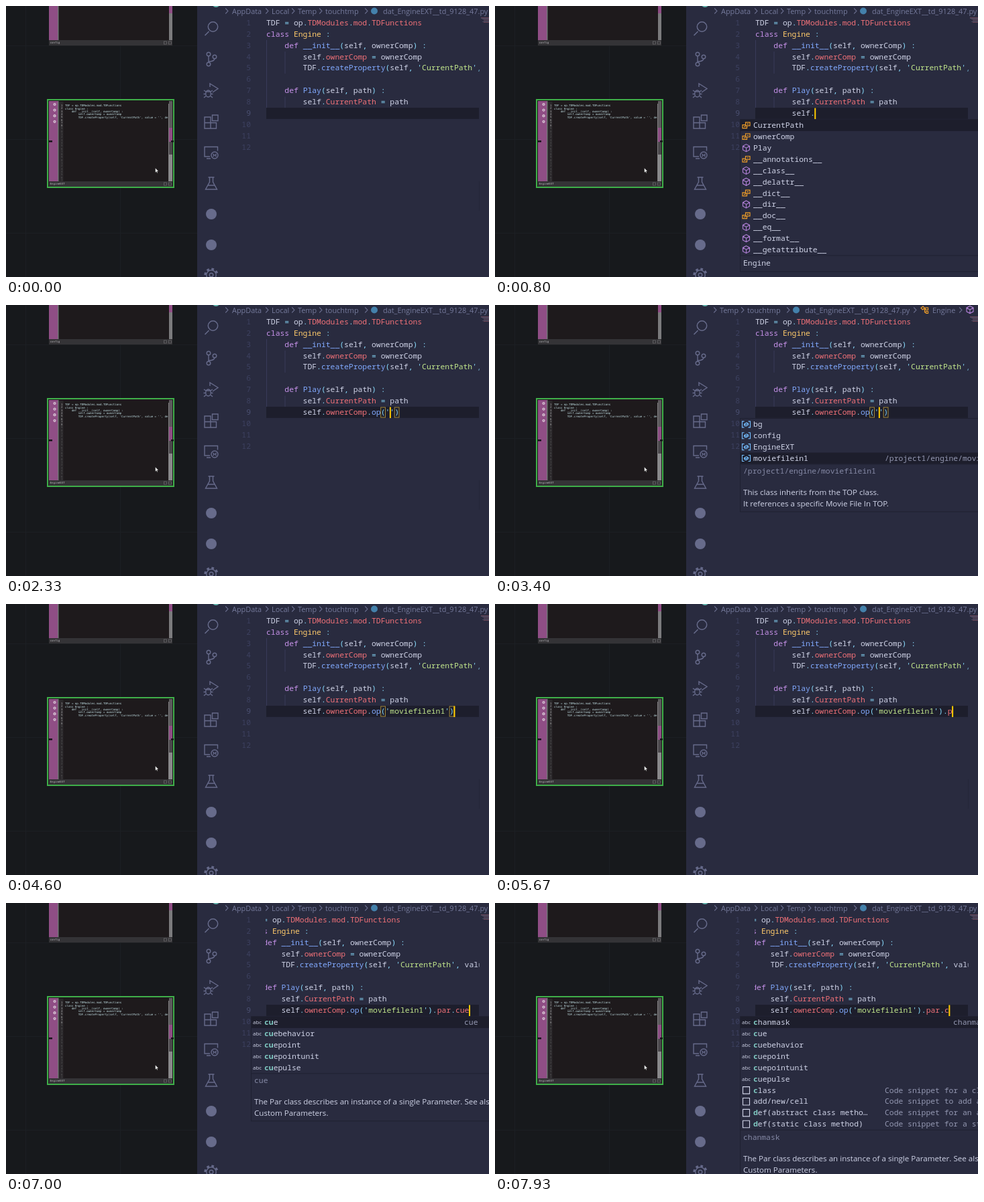
An HTML page for the animation above (8000 ms loop, 720 by 405 pixels).

```html
<!DOCTYPE html>
<html lang="en">
<head>
<meta charset="utf-8">
<title>Code editor</title>
<style>
html, body { margin: 0; width: 100%; height: 100%; overflow: hidden; background: #17191c; }
svg { display: block; width: 100vw; height: 100vh; }
text { white-space: pre; }
.mono { font: 11.38px "Noto Sans Mono", "DejaVu Sans Mono", monospace; }
.sans { font: 11.6px "Open Sans", "Noto Sans", sans-serif; }
.crumb { font: 10.9px "Open Sans", "Noto Sans", sans-serif; }
.mini { font: 4.12px "DejaVu Sans Mono", monospace; }
</style>
</head>
<body>
<svg id="stage" viewBox="0 0 720 405" xmlns="http://www.w3.org/2000/svg"></svg>
<script>
const LOOP = 8000, CW = 6.828, LH = 16.87, LEFT = 388, CARET_MAX = 690.5, BLINK = 530;
const BG = '#292b3f', DARK = '#1d1e2c', DIM = '#676b8b', FG = '#d0d4e8', YELLOW = '#ffcc00';

const rect = (x, y, w, h, fill, extra = '') =>
  `<rect x="${x}" y="${y}" width="${w}" height="${h}" fill="${fill}" ${extra}/>`;
const line = (d, stroke, width = 1) =>
  `<path d="${d}" fill="none" stroke="${stroke}" stroke-width="${width}"/>`;
const disc = (x, y, r, fill) => `<circle cx="${x}" cy="${y}" r="${r}" fill="${fill}"/>`;
const esc = s => s.replace(/&/g, '&amp;').replace(/</g, '&lt;');
const text = (x, y, s, fill, cls = 'mono', extra = '') =>
  `<text x="${x}" y="${y}" fill="${fill}" class="${cls}" ${extra}>${s}</text>`;
const rowY = n => 25 + LH * (n - 1);

// Syntax colouring
const TOKEN = /'[^']*'?|\b(?:class|def)\b|\.?[A-Za-z_]\w*\(?|[=:.,()]|\s+|./g;
function paint(src) {
  const span = (s, c) => `<tspan fill="${c}">${esc(s)}</tspan>`;
  let last = '';
  return src.replace(TOKEN, tok => {
    const prev = last;
    if (tok.trim()) last = tok;
    if (tok[0] === "'") {
      const end = tok.length > 1 && tok.endsWith("'") ? "'" : '';
      return span("'", '#89ddff') + span(tok.slice(1, tok.length - end.length), '#c3e88d') + span(end, '#89ddff');
    }
    if (tok === 'class' || tok === 'def') return span(tok, '#c792ea');
    if (prev === 'class') return span(tok, '#ffcb6b');
    if (/\w\($/.test(tok)) {
      const dot = tok[0] === '.' ? '.' : '';
      return span(dot, '#89ddff') + span(tok.slice(dot.length, -1), '#82aaff') + span('(', '#89ddff');
    }
    if (/^\.\w/.test(tok)) return span('.', '#89ddff') + span(tok.slice(1), '#f07178');
    return span(tok, /^[=:.,()]$/.test(tok) ? '#89ddff' : FG);
  });
}

const SOURCE = [
  'TDF = op.TDModules.mod.TDFunctions',
  'class Engine :',
  '    def __init__(self, ownerComp) :',
  '        self.ownerComp = ownerComp',
  "        TDF.createProperty(self, 'CurrentPath', value = '', de",
  '',
  '    def Play(self, path) :',
  '        self.CurrentPath = path'
];

// Node network
function network() {
  const grid = line('M29.5 0V405M170.5 0V405M0 59.5H285M0 199.5H285M0 339.5H285', '#1c1f23');
  const footer = (y, name) => rect(64, y, 184, 8, '#343336') +
    text(65.5, y + 5.3, name, '#b8b8bc', 'mini') +
    `<g fill="none" stroke="#77777b" stroke-width=".6"><rect x="235.5" y="${y + 2}" width="4" height="4"/><rect x="242.5" y="${y + 2}" width="4" height="4"/></g>`;
  const top = rect(64, 0, 184, 52, '#1e1a1c') + rect(64, 0, 13, 52, '#8f4e85') + rect(77, 0, 1.5, 52, '#77777a') +
    rect(243, 0, 5, 11, '#8f4e85') + rect(243, 11, 5, 41, '#7b7b7d') + footer(51, 'config');
  let node = rect(62, 140, 188, 131, '#1e1a1c', 'stroke="#3fae49" stroke-width="2"') +
    rect(64, 142, 13, 120, '#8f4e85') + rect(77, 142, 1.5, 120, '#77777a') +
    rect(79, 143, 6.5, 119, '#2a272a') +
    rect(243, 142, 5, 40, '#5c5a5d') + rect(243, 182, 5, 21, '#8f4e85') +
    rect(243, 203, 5, 19, '#4b484c') + rect(243, 222, 5, 40, '#8a8a8c') +
    line('M242.5 146V262', '#9a9a9c', .8) + rect(64, 201, 5, 2.5, '#17131a') + rect(246, 201, 4, 2.5, '#17131a') +
    footer(262, 'EngineEXT');
  for (let i = 0; i < 4; i++) node += disc(72.5, 147 + 8.6 * i, 2.1, '#d9c6d6') + disc(72.5, 147 + 8.6 * i, .8, '#8f4e85');
  for (let i = 0; i < 27; i++) node += text(82, 150 + 4.3 * i, (i + 1) % 10, i < 8 ? '#aaa' : '#555', 'mini');
  SOURCE.slice(0, 5).forEach((s, i) => node += text(88, 150.4 + 4.3 * i, s, '#c5e3e8', 'mini'));
  const pointer = '<path d="M222.5 242l.2 7 1.6-1.5 1 2.3 1-.5-1-2.2 2-.2z" fill="#fff" stroke="#111" stroke-width=".4"/>';
  return rect(0, 0, 285, 405, '#17191c') + grid + top + node + pointer;
}

const ICON = {
  cube: (x, y, c = '#b180d7') => line(`M${x} ${y - 5.5}l5 2.7v5.6l-5 2.7-5-2.7v-5.6zM${x - 5} ${y - 2.8}l5 2.8 5-2.8M${x} ${y}v5.5`, c, 1.1),
  field: (x, y) => line(`M${x - 1} ${y - 4.5}h6.5v5h-6.5zM${x - 1} ${y - .8}h-4.5v5h6.5v-3.7M${x + 1} ${y - 2}h2.5M${x - 3.5} ${y + 1.7}h2.5`, '#ee9d28', 1.2),
  value: (x, y) => line(`M${x - 3} ${y - 4.5}h-3v9h3M${x + 3} ${y - 4.5}h3v9h-3M${x - 3} ${y - .5}l3.5-2 2.5 1.3v2l-3.5 2-2.5-1.3zl2.5 1.3 3.5-2`, '#75beff', 1.1),
  abc: (x, y) => text(x - 6.5, y + 3, 'abc', FG, 'sans', 'style="font-size:8px"'),
  snippet: (x, y) => line(`M${x - 5} ${y - 5}h10v10.5h-10z`, FG, 1.1)
};

function activityBar() {
  const c = DIM;
  return line('M302.5 38l-6 6', c, 1.6) + `<circle cx="308.5" cy="31" r="7.2" fill="none" stroke="${c}" stroke-width="1.5"/>` +
    `<g fill="none" stroke="${c}" stroke-width="1.4"><circle cx="302" cy="72" r="2.8"/><circle cx="302" cy="87" r="2.8"/><circle cx="311" cy="76" r="2.8"/>` +
    `<path d="M302 75v9M311 79q-1 4-9 4"/>` +
    `<path d="M304 121v-5l12 7.5-8 5.5"/><ellipse cx="301.5" cy="131" rx="3.8" ry="5"/><path d="M298 128h7M295 126l3 2M308 126l-3 2M294.500 131.500h3M305.500 131.500h3M295 137l3-2.500M308 137l-3-2.500"/>` +
    `<path d="M296 166h9v17h-9zM296 174.500h17.500v8.500h-9M307.500 163h8.500v8.500h-8.500z"/>` +
    `<path d="M304 225h-8v-14.500h19.500v6M299 228h6"/><circle cx="311" cy="223" r="5"/><path d="M308.500 221l2 2-2 2M313.500 221l-1.500 2 1.500 2"/>` +
    `<path d="M301.500 256h9M303.500 256v7l-6 11h17l-6-11v-7M300.500 268h11"/>` +
    `<circle cx="306" cy="402" r="7.200"/><circle cx="306" cy="402" r="2.800"/><path stroke-width="3.200" stroke-dasharray="3.600 3.600" d="M297 402a9 9 0 0 1 18 0"/></g>` +
    disc(306, 311, 8, c) + disc(306, 357, 8, c) + disc(313, -4.5, 6.5, '#63b5ad');
}

function breadcrumbs() {
  const sep = [329, 389, 428, 469, 537, 726, 794].map(x => line(`M${x - 1.8} 3.5l3.8 4-3.8 4`, DIM, 1.1)).join('');
  const names = [[337, 'AppData'], [396, 'Local'], [435, 'Temp'], [476, 'touchtmp'], [562, 'dat_EngineEXT__td_9128_47.py'], [752, 'Engine']];
  return sep + names.map(([x, s]) => text(x, 11.6, s, '#757a9c', 'crumb')).join('') +
    disc(549, 7.5, 5, '#4481ab') +
    line('M735 4.500l3-2.500 2.500 2.500-3 2.500zM739 6h3M740.500 6v5h2M742 4h3.500v3.500h-3.500zM742.500 9.500h3v3h-3z', '#ee9d28', 1.2) +
    ICON.cube(808, 7);
}

function codeBody() {
  const guides = line(`M388.5 51V152M416 68V101M416 135.500V152`, '#3d4160', .8);
  return guides + SOURCE.map((s, i) => text(LEFT, rowY(i + 1) + 4, paint(s), FG)).join('');
}

function minimap() {
  let out = '';
  for (let i = 0; i < 7; i++) out += rect(708 + [0, 0, 2, 4, 4, 2, 4][i], 17 + i * 1.2, 12, .7, i % 3 ? '#74677f' : '#a5606f', 'opacity=".7"');
  return out + line('M705.5 262V306', '#242638');
}

// Typing: [time, text before caret, text after caret]
const CALL = "self.ownerComp.op('moviefilein1')";
const FULL = CALL + '.par.cue';
const keys = [[0, '', '']];
const type = (src, from, times, after = '') =>
  times.forEach((t, i) => keys.push([t, src.slice(0, from + i + 1), after]));
type(FULL, 0, [330, 430, 530, 630, 730]);
keys.push([1000, 'self.ownerComp', '']);
type(FULL, 14, [1400, 1530, 1670]);
type(FULL, 17, [1930], ')');
type(FULL, 18, [2130], "')");
keys.push([3600, CALL.slice(0, -2), "')"], [4100, CALL, '']);
type(FULL, CALL.length, [5470, 5600, 5730, 5800, 5930, 6130, 6600, 6800]);
keys.push([7330, FULL.slice(0, -1), ''], [7530, FULL.slice(0, -2), '']);
const caretX = key => LEFT + (8 + key[1].length) * CW;

// Suggestion lists
const list = (icon, names, more = {}) => ({ rows: names.split(' ').map(n => [icon, n]), ...more });
const PAR_DOC = ['The Par class describes an instance of a single Parameter. See also', 'Custom Parameters.'];
const members = {
  rows: ['CurrentPath', 'ownerComp', 'Play', ...'annotations class delattr dict dir doc eq format getattribute'.split(' ').map(n => `__${n}__`)]
    .map(n => [/Path|Comp|annot|dict|doc/.test(n) ? 'field' : 'cube', n]),
  label: 'Engine', doc: []
};
const opNames = ['bg', 'config', 'EngineEXT', 'moviefilein1'];
const opLists = opNames.map((n, sel) => {
  const kind = sel % 3 ? 'DAT' : 'TOP', path = '/project1/engine/' + n;
  return {
    ...list('value', opNames.join(' ')), sel, label: path, detail: path, detailX: 581,
    doc: [`This class inherits from the ${kind} class.`, `It references a specific ${sel === 3 ? 'Movie File In' : sel ? 'Text' : 'Constant'} ${kind}.`]
  };
});
const parList = (names, hit) => {
  const first = names.split(' ')[0];
  return list('abc', names, { label: first, detail: first, detailX: 683, doc: PAR_DOC, hit });
};
const CUES = 'cue cuebehavior cuepoint cuepointunit cuepulse';
const parAll = parList('alignoob chanmask ' + CUES + ' deinterlace file', 0);
const parC = parList('chanmask ' + CUES, 1);
const parCue = parList(CUES, 2);
const parSnip = { ...parC, rows: [...parC.rows,
  ['snippet', 'class', 'Code snippet for a class'],
  ['snippet', 'add/new/cell', 'Code snippet to add a cell'],
  ['snippet', 'def(abstract class metho…', 'Code snippet for an abstract'],
  ['snippet', 'def(static class method)', 'Code snippet for a static']] };
const popups = [[0, null], [730, members], [1000, null], [2600, opLists[0]], [2870, opLists[1]], [3000, opLists[2]],
  [3130, opLists[3]], [3600, null], [5930, parAll], [6130, parC], [6600, parCue], [7530, parSnip]];

function popup(p) {
  if (!p) return '';
  const sel = p.sel || 0, top = 170, end = top + p.rows.length * LH;
  const bottom = end + (p.doc.length ? 72 : 25);
  let out = rect(365.5, top - .5, 360, bottom - top, BG, 'stroke="#1f2131"') + rect(366, top + sel * LH, 354, LH, DARK);
  p.rows.forEach(([icon, name, note], i) => {
    const y = top + 8.4 + i * LH, n = name[0] === 'c' || name[0] === 'd' ? p.hit || 0 : 0;
    const label = icon === 'abc' || icon === 'snippet'
      ? `<tspan fill="#80cbc4" font-weight="700">${name.slice(0, n)}</tspan>${name.slice(n)}` : name;
    out += ICON[icon](374.5, y) + text(385, y + 4, label, FG);
    if (note) out += text(581, y + 4, note, '#9498b2');
    else if (i === sel && p.detail) out += text(p.detailX, y + 4, p.detail, '#9498b2');
  });
  out += line(`M366 ${end + .5}H720`, '#1f2131');
  out += text(370, end + (p.doc.length ? 15 : 16), p.label, p.doc.length ? '#8589a5' : FG);
  p.doc.forEach((s, i) => out += text(370, end + 47 + i * LH, s, FG, 'sans'));
  return out;
}

let numbers = '';
for (let n = 1; n <= 12; n++) numbers += text(365, rowY(n) + 4, n, n === 9 ? '#4b5072' : '#3d4160', 'mono', 'text-anchor="end"');

document.getElementById('stage').innerHTML =
  `<defs><clipPath id="codeClip">${rect(387, 0, 318.5, 405, '#000')}</clipPath><clipPath id="crumbClip">${rect(325, 0, 395, 17, '#000')}</clipPath></defs>` +
  network() + rect(285, 0, 435, 405, BG) + activityBar() +
  `<g clip-path="url(#crumbClip)"><g id="crumbs">${breadcrumbs()}</g></g>` +
  numbers + rect(388, 152, 317, 16.8, DARK) + minimap() +
  `<g clip-path="url(#codeClip)"><g id="scroll">${codeBody()}<g id="typed"></g>${rect(0, 152.5, 2, 16.5, YELLOW, 'id="caret"')}</g></g><g id="popup"></g>`;

const $ = id => document.getElementById(id);
const parts = { crumbs: $('crumbs'), scroll: $('scroll'), typed: $('typed'), caret: $('caret'), popup: $('popup') };
const latest = (rows, t) => rows.filter(r => r[0] <= t).pop();

function typedLine([, before, after]) {
  const s = before + after, at = before.length;
  let out = text(LEFT, rowY(9) + 4, paint('        ' + s), FG);
  const open = s.indexOf('('), close = s.indexOf(')');
  if (close >= 0 && (at === close + 1 || after))
    for (const i of [open, close])
      out += rect(LEFT + (8 + i) * CW, 153, CW, 15, 'none', 'stroke="#b0923a" stroke-width=".9"');
  return out;
}

let shownKey, shownPopup;
function render(t) {
  const key = latest(keys, t), pop = latest(popups, t)[1];
  if (key !== shownKey) {
    shownKey = key;
    parts.typed.innerHTML = typedLine(key);
    parts.caret.setAttribute('x', caretX(key) - .5);
    const shift = Math.max(0, ...keys.filter(k => k[0] <= t).map(k => caretX(k) - CARET_MAX));
    parts.scroll.setAttribute('transform', `translate(${-shift} 0)`);
  }
  if (pop !== shownPopup) {
    shownPopup = pop;
    parts.popup.innerHTML = popup(pop);
  }
  const lit = key[0] > 0 && Math.floor((t - key[0]) / BLINK) % 2 === 0;
  parts.caret.setAttribute('visibility', lit ? 'visible' : 'hidden');
  const outlined = (t >= 2870 && t < 3600) || (t >= 4900 && t < 5470);
  parts.crumbs.setAttribute('transform', `translate(${outlined ? -100 : 0} 0)`);
}

function frame() {
  render(performance.now() % LOOP);
  requestAnimationFrame(frame);
}
frame();
</script>
</body>
</html>
```
